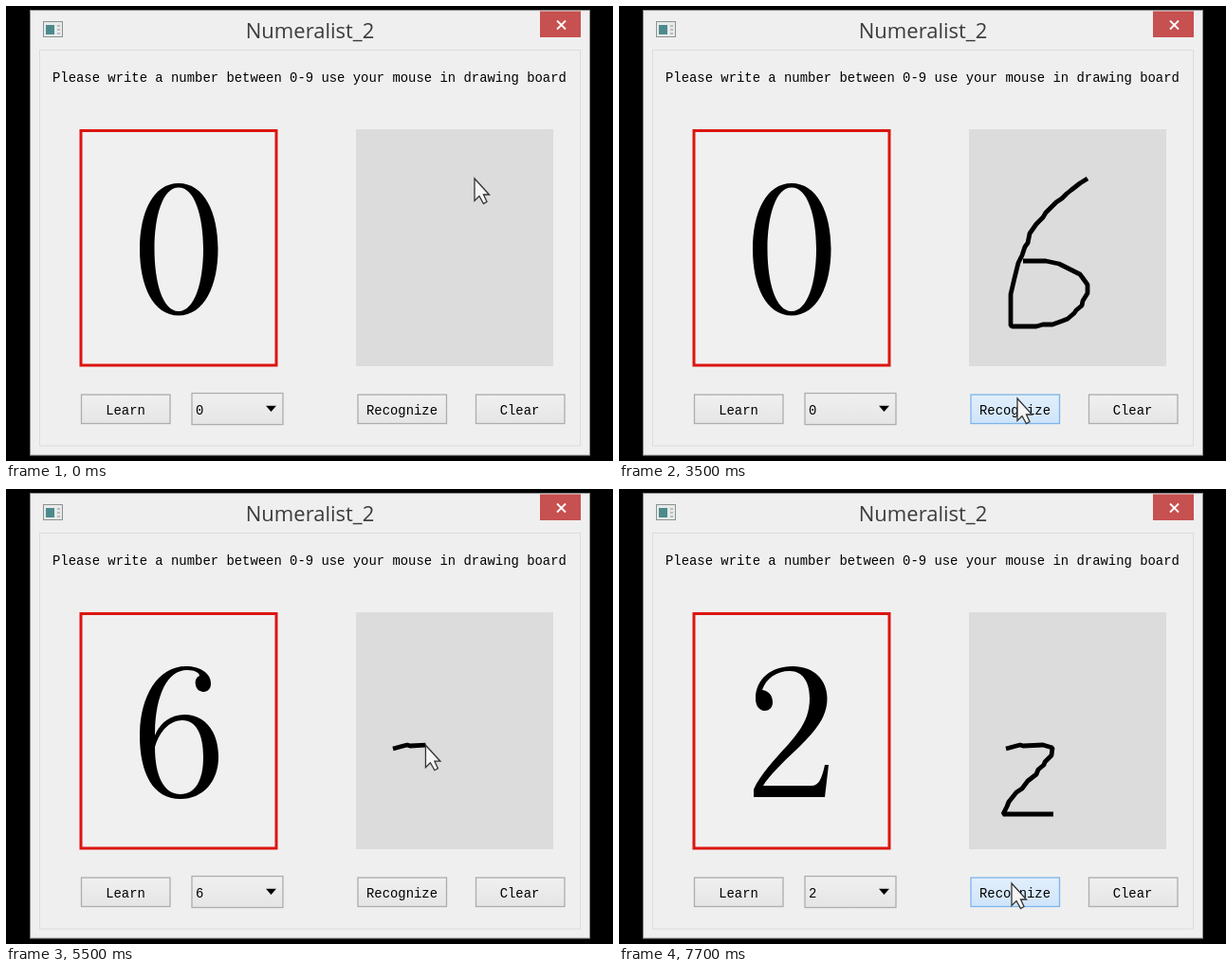
These frames come from a looping animation (640 px wide and 480 px high, 7800 ms). An HTML page:

```html
<!DOCTYPE html>
<html lang="en">
<head>
<meta charset="utf-8">
<title>Numeralist_2</title>
<style>
  html, body { margin: 0; width: 100%; height: 100%; overflow: hidden; background: #000; }
  svg { display: block; width: 640px; height: 480px; }
  text { font: 13.9px "Liberation Mono", monospace; fill: #000; }
  .title { font: 22px "Open Sans", sans-serif; fill: #3c3c3c; }
  .mid { text-anchor: middle; }
  .btn rect { fill: url(#plain); stroke: #adadad; stroke-width: 1.3; }
  .btn.hover rect { fill: url(#hover); stroke: #7eb4ea; }
  .btn.down rect { fill: url(#down); stroke: #6aa5e0; }
  .ink { fill: none; stroke: #000; stroke-width: 4.8; stroke-linejoin: bevel; }
</style>
</head>
<body>
<svg viewBox="0 0 640 480">
  <defs>
    <linearGradient id="plain" x2="0" y2="1"><stop stop-color="#f0f0f0"/><stop offset="1" stop-color="#e5e5e5"/></linearGradient>
    <linearGradient id="hover" x2="0" y2="1"><stop stop-color="#e2effc"/><stop offset="1" stop-color="#cfe4fa"/></linearGradient>
    <linearGradient id="down" x2="0" y2="1"><stop stop-color="#dcebfb"/><stop offset="1" stop-color="#c8e0f9"/></linearGradient>
  </defs>

  <rect x="25.5" y="4.5" width="590" height="469.500" fill="#efefef" stroke="#8a8a8a"/>
  <rect x="35.5" y="46.5" width="570" height="417.5" fill="none" stroke="#dcdcdc"/>
  <rect x="39.5" y="16.5" width="20" height="16" fill="#e8eaea" stroke="#8c9292"/>
  <rect x="42" y="20" width="9" height="10" fill="#4d8a8c"/>
  <path d="M54 21h3M54 25h3M54 29h3" stroke="#8c9292"/>
  <text class="title mid" x="320.5" y="34">Numeralist_2</text>
  <rect x="563" y="5.5" width="43" height="27.5" fill="#c75050"/>
  <path d="M581 15.500l9 9m0-9l-9 9" stroke="#fff" stroke-width="1.8"/>
  <text x="49" y="80">Please write a number between 0-9 use your mouse in drawing board</text>

  <rect x="79" y="131.5" width="206" height="247.5" fill="#f0f0f0" stroke="#dc1510" stroke-width="3"/>
  <path id="digit" fill-rule="evenodd"/>
  <rect x="369" y="130" width="208" height="250" fill="#dcdcdc"/>
  <polyline id="six" class="ink" points="494,182 486,187 477,194 472,198 467,203 461,207 450,218 447,223 440,230 433,240 431,250 428,254 425,263 421,271 417,287 413,304 413,337 415,338 440,338 447,336 457,336 468,332 473,330 480,324 482,321 488,316 489,311 494,303 494,294 489,287 486,283 478,279 464,272 450,269 426,269"/>
  <polyline id="two" class="ink" points="408,274 419,271 423,270 426,271 447,270 457,273 456,281 449,288 448,291 442,296 440,301 431,308 425,316 419,320 411,330 409,335 405,343 458,343"/>

  <g class="btn"><rect x="79.5" y="410" width="93.5" height="30.5"/><text class="mid" x="126" y="431">Learn</text></g>
  <g class="btn"><rect x="196" y="408.5" width="96" height="33"/><text id="choice" x="200" y="431">0</text><path d="M274 421.700h11l-5.500 6.300z"/></g>
  <g class="btn" id="recognize"><rect x="371" y="410" width="93.5" height="30.5"/><text class="mid" x="417.5" y="431">Recognize</text></g>
  <g class="btn" id="clear"><rect x="495.5" y="410" width="93.5" height="30.5"/><text class="mid" x="541.5" y="431">Clear</text></g>

  <path id="cursor" d="M0 0V23.5L5 18.5L9.5 26.5L13 24.5L9.5 17H15.5Z" fill="#f6f6f6" stroke="#333" stroke-width="1.3"/>
</svg>
<script>
const LOOP = 7800, STEP = 100;
const $ = id => document.getElementById(id);
const six = $('six'), two = $('two');

const shapes = {
  0: 'M182 187C209 187 223.500 218 223.500 256.500S209 326.500 182 326.500S141 295 141 256.500S155 187 182 187Z' +
     'M182 191.500C199 191.500 208 222 208 256.500S199 322 182 322S156.500 291 156.500 256.500S165 191.500 182 191.500Z',
  6: 'M216 205C216 194 204 187 190 187C158 187 141 222 141 260C141 300 155 327 184 327C208 327 224 308 224 283' +
     'C224 256 210 238 188 238C172 238 161 249 157 260C157 218 170 191 191 191C199 191 204 194 204 197' +
     'C200 199 199 203 200 207C201 212 205 214 209 214C214 213 216 210 216 205Z' +
     'M186 244C200 244 208 258 208 283C208 308 199 322 184 322C166 322 157 302 157 272C162 255 173 244 186 244Z',
  2: 'M162 225C162 231 158 234 153 234C147 233 144 228 144 221C144 201 160 187 183 187C205 187 219.500 201 219.500 221' +
     'C219.500 243 204 258 187 275C171 290 158 303 152 313H203C211 313 214 305 217 291H221L217 325H142V317' +
     'C148 303 163 286 178 270C193 253 201 240 201 221C201 204 194 192 180 192C166 192 155 200 151 212' +
     'C158 213 162 218 162 225Z'
};

// Pointer moves between strokes: [time, x, y]
const moves = [
  [2300, 430, 270], [2500, 430, 270], [3300, 420, 414], [3700, 420, 414],
  [4300, 530, 424], [4400, 530, 424], [4700, 512, 229], [5300, 409, 274],
  [6400, 456, 343], [6500, 456, 343], [7100, 414, 416], [7800, 414, 416]
];

// Piecewise interpolation over rows of [time, ...values]
function between(rows, t, ease = k => k) {
  if (t <= rows[0][0]) return rows[0].slice(1);
  const i = rows.findIndex(r => r[0] >= t);
  if (i < 0) return rows[rows.length - 1].slice(1);
  const a = rows[i - 1], b = rows[i], k = ease((t - a[0]) / (b[0] - a[0]));
  return a.slice(1).map((v, j) => v + (b[j + 1] - v) * k);
}
const smooth = k => k * k * (3 - 2 * k);

const sixLength = six.getTotalLength(), twoLength = two.getTotalLength();
const corner = 184 / sixLength;
const sixPace = [[100, 0], [500, corner * .2], [600, corner * .2], [1400, corner], [2200, 1]];
const twoPace = [[5300, 0], [6400, 1]];

function ink(line, length, part, shown) {
  line.style.display = shown && part > 0 ? '' : 'none';
  line.style.strokeDasharray = part < 1 ? `${length * part} ${length * 2}` : 'none';
}

function button(id, hover, down) {
  $(id).setAttribute('class', 'btn' + (down ? ' down' : hover ? ' hover' : ''));
}

function draw(now) {
  const t = Math.floor(now % LOOP / STEP) * STEP;
  const [a] = between(sixPace, t), [b] = between(twoPace, t);
  ink(six, sixLength, a, t < 4500);
  ink(two, twoLength, b, true);

  let [x, y] = between(moves, t, smooth);
  const pen = t < 2300 ? six.getPointAtLength(a * sixLength)
    : t > 5300 && t < 6400 ? two.getPointAtLength(b * twoLength) : null;
  if (pen) ({ x, y } = pen);
  $('cursor').setAttribute('transform', `translate(${x} ${y})`);

  const digit = t < 3700 ? 0 : t < 7300 ? 6 : 2;
  $('digit').setAttribute('d', shapes[digit]);
  $('choice').textContent = digit;
  const first = t >= 3200 && t < 4000, second = t >= 7000;
  button('recognize', first || second, t === 3600 || t === 7200);
  button('clear', t >= 4200 && t < 5000, t >= 4400 && t < 4800);
  requestAnimationFrame(draw);
}
requestAnimationFrame(draw);
</script>
</body>
</html>
```
